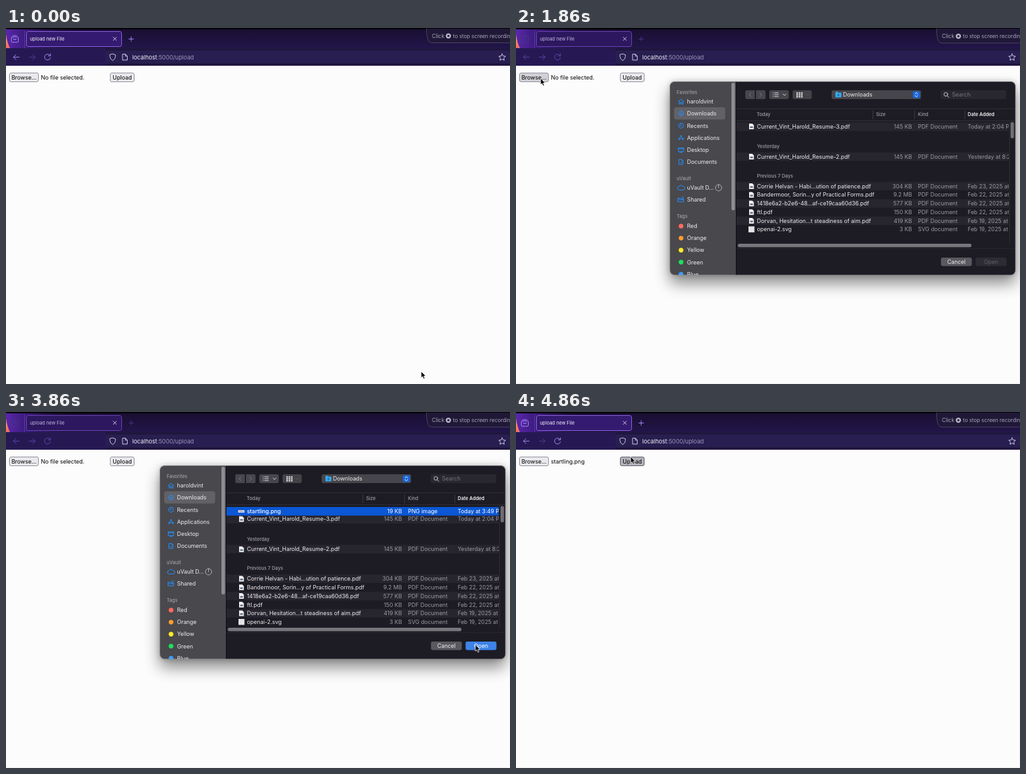
Recreate the animation shown at these times as an HTML page. Size 800 by 566 pixels, loop 5000 ms.

```html
<!DOCTYPE html>
<html lang="en">
<head>
<meta charset="utf-8">
<title>Upload demo</title>
<style>
html, body { margin: 0; width: 100%; height: 100%; overflow: hidden; background: #fcfcfc; }
#stage { position: absolute; left: 0; top: 0; width: 800px; height: 566px; overflow: hidden; }
svg { position: absolute; left: 0; top: 0; display: block; }
text { font-family: Inter, "Liberation Sans", sans-serif; font-size: 8.9px; white-space: pre; }
.line { fill: none; stroke-width: 1; stroke-linecap: round; stroke-linejoin: round; }
.small { font-size: 7.5px; }

/* browser window */
.nav { stroke: #a78bf5; }
.off { stroke: #50408c; }
.fixed { stroke: #d3cbef; }
#tabText { fill: #f4f0ff; font-size: 7.4px; }
#tab { fill: #351b70; stroke: #9164ea; }
.inactive .nav, .inactive .off { stroke: #5c47ae; }
.inactive .plus, .inactive .view { stroke: #493580; }
.inactive #tab, .fading #tab { fill: #2d185f; stroke: #6f43bd; }
.inactive #tabText, .fading #tabText { fill: #c3b5e2; }
.fading .view { stroke: #6b50b2; }
.button { fill: #e9e9ed; stroke: #8f8f9d; }
.button.hover { fill: #d0d0d7; }
.button.down { fill: #b1b1b9; stroke: #5f5f6c; }
.page { font-size: 9px; fill: #000; }

/* file dialog */
#dialog { position: absolute; left: 244px; top: 85px; width: 549px; height: 308px; border-radius: 8px;
  box-shadow: 0 13px 24px rgba(0,0,0,.46), 0 0 8px rgba(0,0,0,.2); }
#dialog svg { border-radius: 8px; }
#dialog.blank { background: rgba(0,0,0,.5); }
#dialog.blank svg { visibility: hidden; }
#dialog::after { content: ""; position: absolute; inset: 0; border-radius: 8px; border: 1px solid rgba(160,160,164,.5); }
.white { fill: #eeedf0; }
.grey { fill: #9b9aa1; }
.head { fill: #a09fa6; font-size: 7.5px; font-weight: 500; }
.control { fill: #47464c; }
.blue { stroke: #2390ff; }
.selected text { fill: #fff; }
.selected .name { font-weight: 500; }
</style>
</head>
<body>
<div id="stage">
  <svg id="browser" width="800" height="566">
    <defs>
      <linearGradient id="strip" x2="0" y2="1"><stop stop-color="#190e30"/><stop offset="1" stop-color="#22164a"/></linearGradient>
      <linearGradient id="glow"><stop stop-color="#5a27ae"/><stop offset=".35" stop-color="#3f1d85" stop-opacity=".8"/><stop offset="1" stop-color="#2a1858" stop-opacity="0"/></linearGradient>
      <linearGradient id="ember" x2="0" y2="1"><stop stop-color="#ffad62"/><stop offset="1" stop-color="#f0685e"/></linearGradient>
    </defs>
    <rect width="800" height="566" fill="#fcfcfc"/>
    <rect width="800" height="33" fill="url(#strip)"/>
    <rect y="2" width="100" height="31" fill="url(#glow)"/>
    <path d="M0 10Q2 25 7 33H0Z" fill="url(#ember)"/>
    <rect y="32" width="800" height="28" fill="#21173f"/>
    <rect y="32" width="158" height="28" fill="#261953"/>
    <rect x="158" y="36" width="642" height="20" rx="3" fill="#281f50"/>
    <path d="M29.5 4V32" class="line" stroke="#6b42b5" opacity=".7"/>
    <rect width="800" height="2" fill="#000"/>

    <rect id="tab" x="32.5" y="5.5" width="151" height="24" rx="3"/>
    <text id="tabText" x="38" y="20.2">upload new File</text>
    <path class="line fixed" d="M170.2 14.7l5 5m0-5l-5 5"/>
    <path class="line nav plus" d="M195 17.5h7.4m-3.7-3.7v7.4"/>
    <path class="line nav view" d="M11 12.2h6M9.5 14.2h9q1 0 1 1v6q0 1.5-1.5 1.5h-8q-1.500 0-1.500-1.500v-6q0-1 1-1M12 17v1.300h4V17"/>

    <path class="line nav" d="M21 46.300h-9m3.800-4l-4 4l4 4"/>
    <path class="line off" d="M37 46.300h9m-3.800-4l4 4l-4 4"/>
    <path class="line nav" d="M69.500 43.200a4.700 4.700 0 1 0 1 4.200M70.600 41v3.300h-3.300"/>
    <path class="line fixed" d="M169.300 41.200l4.500 1.500q.2 6.500-4.500 9q-4.700-2.500-4.500-9ZM185.500 41.500h4l3 3v6.500h-7.500v-9ZM189.300 41.700v3h3"/>
    <path class="line fixed" d="M787.500 41l1.600 3.500l3.900.5l-2.900 2.600l.8 3.800l-3.400-1.900l-3.400 1.900l.8-3.800l-2.900-2.600l3.900-.5Z"/>
    <text x="200.500" y="49.600" style="font-size:9.200px" fill="#f5f2ff">localhost<tspan fill="#9d94bd">:5000/upload</tspan></text>

    <g id="pill">
      <path d="M667.500 0Q667 10 669.500 18Q671 23.500 677 23.500H802V0Z" fill="#1f1836" stroke="#4b4465"/>
      <text x="676" y="15.500" fill="#aaa4ba" style="font-size:8.500px">Click</text>
      <circle cx="702.200" cy="12.600" r="4.200" fill="#bbb6c9"/>
      <rect x="700.700" y="11.100" width="3" height="3" fill="#1f1836"/>
      <text x="709.500" y="15.500" fill="#aaa4ba" style="font-size:8.300px">to stop screen recording</text>
    </g>
    <rect y="0" width="800" height="1" fill="#000"/>

    <rect id="browse" class="button" x="5.500" y="71.500" width="46" height="14" rx="2.500"/>
    <text class="page" x="28.500" y="82" text-anchor="middle">Browse...</text>
    <text class="page" id="chosen" x="55.500" y="82"></text>
    <rect id="upload" class="button" x="165.500" y="71.500" width="38" height="14" rx="2.500"/>
    <text class="page" x="184.500" y="82" text-anchor="middle">Upload</text>
    <path id="edge" d="M799.500 60V565.500H0" fill="none" stroke="#efeff0"/>
  </svg>

  <div id="dialog">
    <svg width="549" height="308" viewBox="244 85 549 308">
      <clipPath id="table"><rect x="350" y="148" width="432" height="195"/></clipPath>
      <rect x="244" y="85" width="106" height="308" fill="#49484c"/>
      <rect x="349" y="85" width="444" height="308" fill="#1d1b23"/>
      <path d="M349.500 85V393" stroke="#0f0e13"/>
      <rect x="251" y="126" width="81" height="19.500" rx="3.500" fill="#626166"/>
      <g id="sidebar"></g>
      <rect x="342" y="87" width="5.500" height="203" rx="2.700" fill="#8e8d92"/>

      <path class="control" d="M366 99h13v14h-13q-2 0-2-2v-10q0-2 2-2M381 99h13q2 0 2 2v10q0 2-2 2h-13Z"/>
      <path class="line" stroke="#77767d" d="M373 103l-3 3l3 3M387 103l3 3l-3 3"/>
      <rect class="control" x="402" y="99" width="31" height="14" rx="3"/>
      <path class="line" stroke="#dedde2" d="M408 103h.5m2 0h6m-8.500 3h.5m2 0h6m-8.500 3h.5m2 0h6M424 105l2.300 2.300l2.300-2.300M460.500 105l2.300 2.300l2.300-2.300"/>
      <rect class="control" x="439" y="99" width="30.500" height="14" rx="3" style="fill-opacity:.9"/>
      <path fill="none" stroke="#dedde2" stroke-width="2.300" stroke-dasharray="2.500 1.200" d="M445 103.300h10M445 106.300h10M445 109.300h10"/>
      <rect class="control" x="501" y="99" width="142" height="14" rx="3"/>
      <path d="M507 102.500q0-1 1-1h3l1 1.300h3.500q1 0 1 1v5.500q0 1-1 1h-7.500q-1 0-1-1Z" fill="#35a9ee"/>
      <path class="line" stroke="#14649f" d="M511.800 104.500v3.500m-1.500-1.500l1.500 1.500l1.500-1.500"/>
      <text class="white" x="519" y="109.200">Downloads</text>
      <rect x="630" y="100.500" width="11" height="11" rx="2.500" fill="#1768dc"/>
      <path class="line" stroke="#fff" d="M633.500 104.800l2-2l2 2m-4 2.600l2 2l2-2"/>
      <rect x="674" y="99" width="104" height="14" rx="3" fill="#29272f"/>
      <circle class="line" cx="682.300" cy="105.500" r="2.900" stroke="#d4d3d8"/>
      <path class="line" stroke="#d4d3d8" d="M684.500 107.800l2.500 2.500"/>
      <text x="692" y="109.200" fill="#77767e">Search</text>

      <path d="M350 128.500H792M350 147.500H792" stroke="#302e37"/>
      <path d="M566.500 131V145M632.500 131V145M712.500 131V145" stroke="#3a3841"/>
      <text class="head" x="382" y="140">Today</text>
      <text class="head" x="571.500" y="140">Size</text>
      <text class="head" x="638" y="140">Kind</text>
      <text class="head" x="717" y="140" style="fill:#f2f1f4;font-weight:600">Date Added</text>
      <g clip-path="url(#table)">
        <g id="files"></g>
        <g id="fresh"></g>
      </g>
      <path d="M783.500 148V342" stroke="#302e37"/>
      <rect x="785" y="149.500" width="5.500" height="26" rx="2.700" fill="#6f6e75"/>
      <rect x="352" y="343" width="371" height="5.500" rx="2.700" fill="#77767c"/>
      <path d="M350 350.500H792" stroke="#28262e"/>
      <rect x="674.500" y="365" width="49" height="13.500" rx="3" fill="#5a595f"/>
      <text class="white" x="699" y="375" text-anchor="middle">Cancel</text>
      <rect id="open" x="729.500" y="365" width="49" height="13.500" rx="3"/>
      <text id="openText" x="754" y="375" text-anchor="middle">Open</text>
    </svg>
  </div>

  <svg id="cursor" width="16" height="18" style="overflow:visible">
    <path d="M0 0V10.200L2.300 8.100L4 12L5.800 11.200L4.200 7.400H7.300Z" fill="#000" stroke="#fff" stroke-width=".8"/>
  </svg>
</div>

<script>
const $ = id => document.getElementById(id);
const text = (x, y, cls, s, extra = '') => `<text x="${x}" y="${y + 3.2}" class="${cls}" ${extra}>${s}</text>`;

// Sidebar: label, centre y, icon path relative to its centre
const places = [
  ['haroldvint', 117, 'M-4.500 0L0-4L4.500 0M-3-1V4H-1V1H1V4H3V-1'],
  ['Downloads', 136, 'M-4 0a4 4 0 1 0 8 0a4 4 0 1 0-8 0M0-2V2M-1.500 .5L0 2L1.500 .5'],
  ['Recents', 155.300, 'M-4 0a4 4 0 1 0 8 0a4 4 0 1 0-8 0M0-2.500V0H-2'],
  ['Applications', 174.500, 'M-3.500 4L0-4L3.500 4M-4.500 1.500H4.500'],
  ['Desktop', 194, 'M-4-3.500H4V2.500H-4ZM-4-1.800H4M-2 4H2'],
  ['Documents', 213, 'M-3-4H1L3-2V4H-3ZM1-4V-2H3M-1.500 1H1.500'],
  ['uVault D...', 254, 'M-3 3.500a2.500 2.500 0 0 1-.5-5a3.500 3.500 0 0 1 6.500-.5a2.700 2.700 0 0 1 .3 5.500Z'],
  ['Shared', 273, 'M-4.500-2.500H-1L0-1.500H4V3.500H-4.500ZM-4.500 0H4M1-4H4.500']
];
const tags = [['Red', '#ff6961'], ['Orange', '#ff9d2e'], ['Yellow', '#ffe928'], ['Green', '#1ce05a'], ['Blue', '#3b9cff']];
const groups = [['Favorites', 102], ['uVault', 239], ['Tags', 299.500]];
$('sidebar').innerHTML =
  groups.map(([s, y]) => text(255, y - .4, 'head', s)).join('') +
  places.map(([s, y, d]) => `<path class="line blue" transform="translate(262 ${y})" d="${d}"/>` + text(271.5, y, 'white', s)).join('') +
  tags.map(([s, c], i) => `<circle cx="262" cy="${315 + i * 19.1}" r="3.700" fill="${c}"/>` + text(271.5, 315 + i * 19.1, 'white', s)).join('') +
  '<path class="line" stroke="#b4b3b8" d="M316.500 254a5 5 0 1 0 10 0a5 5 0 1 0-10 0M321.500 249V254"/>';

const page = y => `<path d="M370 ${y - 4.500}h5l2.500 2.500v6.500h-7.500Z" fill="#f2f2f4"/><path d="M371.500 ${y}h4.500v2.500h-4.500Z" fill="#5c6f88"/>`;
const row = (y, name, size, kind, date, icon = page(y)) => icon +
  text(382.5, y, 'white name', name) +
  text(628.5, y, 'grey', size, 'text-anchor="end"') +
  text(638, y, 'grey', kind) + text(717, y, 'grey', date);
const pdf = (y, name, size, date) => row(y, name, size, 'PDF Document', date);
const stripe = y => `<rect x="350" y="${y - 6.8}" width="432" height="13.600" fill="#27252e"/>`;

$('files').innerHTML =
  [170.500, 218, 265, 292.600, 320].map(stripe).join('') +
  pdf(170.200, 'Current_Vint_Harold_Resume-3.pdf', '145 KB', 'Today at 2:04 PM') +
  text(382.5, 201.5, 'head', 'Yesterday') +
  pdf(218.200, 'Current_Vint_Harold_Resume-2.pdf', '145 KB', 'Yesterday at 8:24 PM') +
  text(382.5, 248, 'head', 'Previous 7 Days') +
  pdf(265, 'Corrie Helvan - Habi...ution of patience.pdf', '304 KB', 'Feb 23, 2025 at 4:10 PM') +
  pdf(278.800, 'Bandermoor, Sorin...y of Practical Forms.pdf', '9.2 MB', 'Feb 22, 2025 at 6:12 PM') +
  pdf(292.600, '1418e6a2-b2e6-48...af-ce19caa60d36.pdf', '577 KB', 'Feb 22, 2025 at 6:02 PM') +
  pdf(306.300, 'ftl.pdf', '150 KB', 'Feb 22, 2025 at 5:31 PM') +
  pdf(320, 'Dorvan, Hesitation...t steadiness of aim.pdf', '419 KB', 'Feb 19, 2025 at 3:15 PM') +
  row(333.800, 'openai-2.svg', '3 KB', 'SVG document', 'Feb 19, 2025 at 1:20 PM',
    '<rect x="369" y="329" width="9.500" height="9.500" fill="#e4e4e6"/>');

$('fresh').innerHTML = '<rect id="pick" x="350" y="151" width="432" height="13.700"/>' +
  row(158, 'startling.png', '19 KB', 'PNG image', 'Today at 3:49 PM',
    '<rect x="368.500" y="156" width="10" height="4" fill="#dcdce0"/><path d="M370 158h7" stroke="#8d8d94"/>');

// Pointer stops: step, x, y
const stops = [
  [0, 659, 546], [6, 70, 65], [10, 39, 80], [13, 39, 80], [16, 418, 152], [19, 418, 154],
  [23, 727, 362], [25, 745, 370], [28, 745, 370], [32, 186, 74], [34, 182, 71], [35, 182, 71]
];
function pointer(n) {
  const i = stops.findIndex(s => s[0] > n);
  const [n0, x0, y0] = stops[i - 1], [n1, x1, y1] = stops[i];
  const p = (n - n0) / (n1 - n0), e = p * p * (3 - 2 * p);
  return [x0 + (x1 - x0) * e, y0 + (y1 - y0) * e];
}

const show = (id, on) => { $(id).style.display = on ? '' : 'none'; };
let last = -1;

function draw(n) {
  const [x, y] = pointer(n);
  $('cursor').style.transform = `translate(${x}px, ${y}px)`;

  $('browser').setAttribute('class', n >= 11 && n < 28 ? 'inactive' : n === 28 ? 'fading' : '');
  $('pill').setAttribute('transform', `translate(0 ${n ? .5 : 0})`);
  $('chosen').textContent = n < 28 ? 'No file selected.' : 'startling.png';
  $('browse').setAttribute('class', 'button' + (n >= 9 && n < 14 ? ' hover' : ''));
  $('upload').setAttribute('class', 'button' + (n === 34 ? ' down' : n >= 32 ? ' hover' : ''));
  show('edge', n >= 11);

  const opening = n === 12, listed = n >= 14, picked = n >= 18;
  show('dialog', n >= 12 && n <= 28);
  $('dialog').className = n === 28 ? 'blank' : '';
  $('dialog').style.transform = opening ? 'translate(-1px, -.5px) scale(.515)' : '';
  $('dialog').style.opacity = opening ? .6 : 1;
  show('fresh', listed);
  $('files').setAttribute('transform', `translate(0 ${listed ? 0 : -13.6})`);
  $('fresh').setAttribute('class', picked ? 'selected' : '');
  $('pick').setAttribute('fill', picked ? '#0b57d5' : 'none');
  $('open').setAttribute('fill', !picked ? '#2d2b33' : n >= 26 ? '#3d83e8' : '#1665db');
  $('openText').setAttribute('fill', picked ? '#fff' : '#626168');
}

const start = performance.now();
function tick() {
  const n = Math.floor((performance.now() - start) % 5000 * 7 / 1000);
  if (n !== last) draw(last = n);
  requestAnimationFrame(tick);
}
tick();
</script>
</body>
</html>
```
